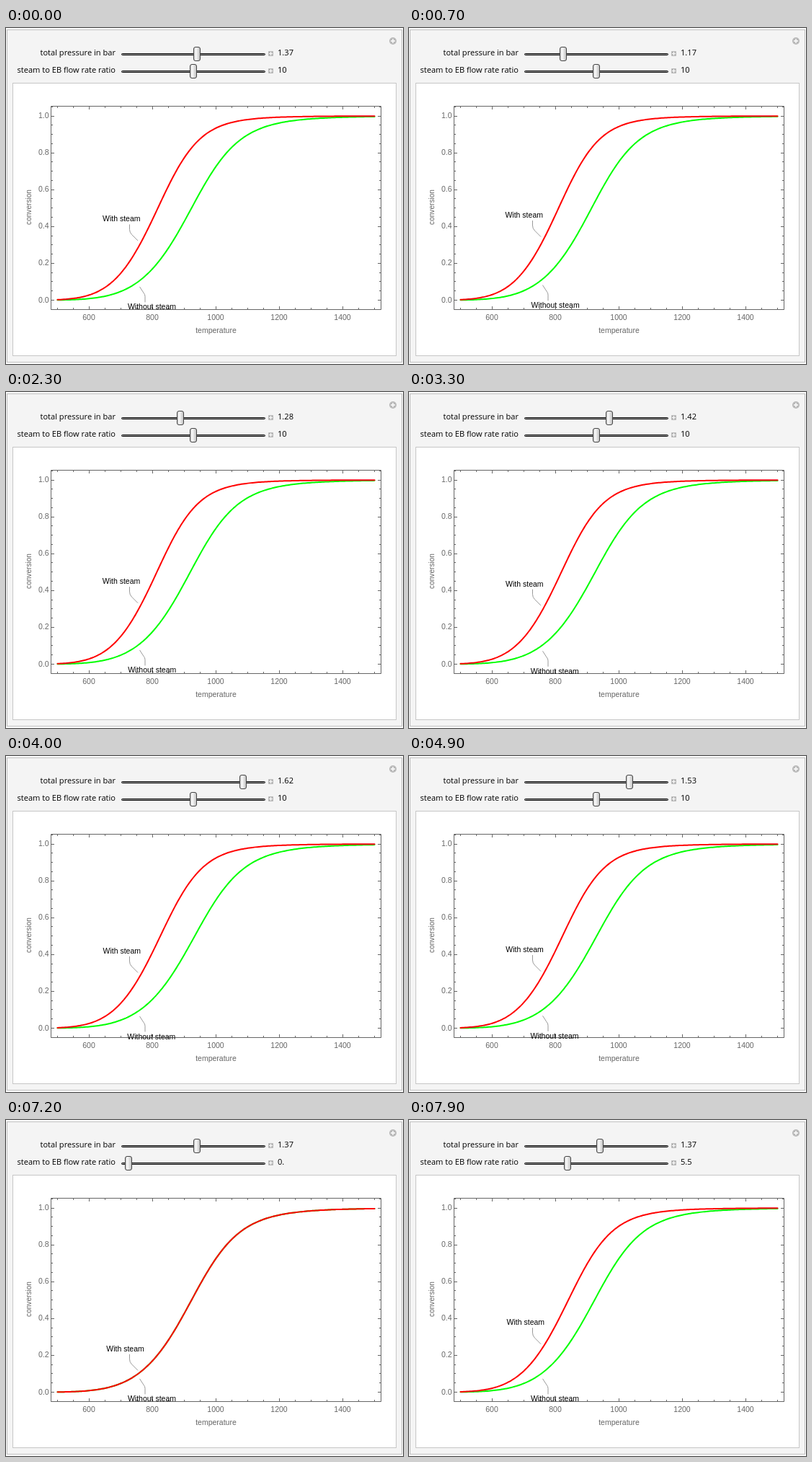
Recreate the animation shown at these times as an HTML page. Size 551 px wide and 466 px high, loop 8 s.

```html
<!DOCTYPE html>
<html lang="en">
<head>
<meta charset="utf-8">
<title>Equilibrium conversion</title>
<style>
  html, body { margin: 0; width: 100%; height: 100%; overflow: hidden; background: #fff; }
  svg { display: block; }
  .ui { font: 11.1px "Open Sans", "Noto Sans", sans-serif; fill: #000; }
  .plot { font: 10.5px "Liberation Sans", Arial, sans-serif; fill: #666; }
  .side { font-size: 10.1px; }
  .note { fill: #000; }
  .end { text-anchor: end; }
  .mid { text-anchor: middle; }
  .line { fill: none; stroke: #666; stroke-width: 1; }
  .curve { fill: none; stroke-width: 2; stroke-linejoin: round; stroke-linecap: round; }
  .leader { fill: none; stroke: #999; stroke-width: 1; }
</style>
</head>
<body>
<svg width="551" height="466" viewBox="0 0 551 466">
  <defs>
    <linearGradient id="metal">
      <stop offset="0" stop-color="#c4c4c4"/>
      <stop offset=".35" stop-color="#fafafa"/>
      <stop offset="1" stop-color="#bdbdbd"/>
    </linearGradient>
    <g id="track">
      <rect x="160.5" y="-1" width="199" height="2" rx="1" fill="#aaa" stroke="#000"/>
      <rect x="364" y="-4.5" width="7" height="7" rx="1" fill="#b9b9b9"/>
      <path d="M365 -1h5M367.5 -3.5v5" stroke="#fff"/>
    </g>
    <rect id="thumb" x="-4.5" y="-10" width="9" height="19" rx="2.5" fill="url(#metal)" stroke="#444"/>
  </defs>

  <rect x="1.5" y="2.5" width="548" height="461" fill="#f4f4f4" stroke="#bfbfbf"/>
  <rect x="9.5" y="76.5" width="532" height="378" fill="#fff" stroke="#c6c6c6"/>
  <circle cx="537" cy="18" r="5" fill="#b9b9b9"/>
  <path d="M534 18h6M537 15v6" stroke="#fff" stroke-width="1.4"/>

  <g class="ui">
    <text class="end" x="152" y="38">total pressure in bar</text>
    <text class="end" x="152" y="62">steam to EB flow rate ratio</text>
    <text id="pText" x="377" y="38"></text>
    <text id="sText" x="377" y="62"></text>
  </g>
  <use href="#track" y="36.5"/>
  <use href="#track" y="60.5"/>
  <use id="pThumb" href="#thumb" y="36.5"/>
  <use id="sThumb" href="#thumb" y="60.5"/>

  <g class="plot">
    <path id="ticks" class="line"/>
    <g id="tickText"></g>
    <text class="mid" x="291.5" y="423">temperature</text>
    <text class="mid side" transform="translate(35 248.5) rotate(-90)">conversion</text>
  </g>
  <path id="dry" class="curve" stroke="#0f0"/>
  <path id="wet" class="curve" stroke="#f00"/>
  <path id="wetLeader" class="leader"/>
  <path id="dryLeader" class="leader"/>
  <g class="plot">
    <text id="wetNote" class="note">With steam</text>
    <text id="dryNote" class="note">Without steam</text>
  </g>
</svg>
<script>
const $ = id => document.getElementById(id);
const set = (id, attrs) => {
  for (const name in attrs) $(id).setAttribute(name, attrs[name]);
};
const px = T => 291.5 + (T - 1000) * 0.44;
const py = X => 377.5 - X * 255.5;

// Equilibrium of EB = styrene + H2, diluted with steam ratio S at pressure P
function conversion(T, P, S) {
  const K = Math.exp(0.425 + 14440 * (1 / 1000 - 1 / T));
  const a = P + K, b = K * S, c = K * (1 + S);
  return (Math.sqrt(b * b + 4 * a * c) - b) / (2 * a);
}

function curve(P, S) {
  const points = [];
  for (let T = 500; T <= 1500; T += 5)
    points.push(px(T).toFixed(2) + ' ' + py(conversion(T, P, S)).toFixed(2));
  return 'M' + points.join('L');
}

function drawAxes() {
  const L = 62.5, R = 520.5, top = 108.5, bottom = 390.5;
  const snap = v => Math.floor(v + 1e-6) + 0.5;
  let d = `M${L} ${top}H${R}V${bottom}H${L}Z`, labels = '';
  for (let T = 500; T <= 1500; T += 50) {
    const major = T % 200 === 0, n = major ? 4.5 : 2.5, x = snap(px(T));
    d += `M${x} ${bottom}v${-n}M${x} ${top}v${n}`;
    if (major) labels += `<text class="mid" x="${px(T) - 0.5}" y="404.5">${T}</text>`;
  }
  for (let i = -1; i <= 21; i++) {
    const major = i % 4 === 0, n = major ? 4.5 : 2.5, y = snap(py(i / 20));
    d += `M${L} ${y}h${n}M${R} ${y}h${-n}`;
    if (major) labels += `<text class="end" x="59.5" y="${py(i / 20) + 3}">${(i / 20).toFixed(1)}</text>`;
  }
  set('ticks', { d });
  $('tickText').innerHTML = labels;
}

// Each control sweeps at 1/25 of its range per step and rests at its start value
function pressure(k) {
  if (k === 0) return 1.37;
  if (k < 30) return Math.min(1.37, 1 + 0.028 * Math.abs(k - 13));
  return Math.max(1.37, 1.7 - 0.028 * Math.abs(k - 43));
}
const ratio = k => Math.min(10, 0.8 * Math.abs(k - 72));
const show = v => Number.isInteger(v) ? v + '.' : String(v);

function draw(k) {
  const P = Math.round(pressure(k) * 100) / 100;
  const S = Math.round(ratio(k) * 2) / 2;
  $('pText').textContent = show(P);
  $('sText').textContent = S === 10 ? '10' : show(S);
  set('pThumb', { x: Math.round(170 + (P - 1) * 180 / 0.7) });
  set('sThumb', { x: Math.round(170 + S * 9) });
  set('dry', { d: curve(P, 0) });
  set('wet', { d: curve(P, S) });

  const wy = py(conversion(765, P, S)) - 31;
  set('wetNote', { x: 133 + (wy - 255) * 0.1, y: wy + 3.5 });
  set('wetLeader', { d: `M171.5 ${wy + 7.5}v7q0 4 3 7l8.5 8.5` });

  const dy = py(conversion(760, P, 0)) + 36.8;
  set('dryNote', { x: 169 - (dy - 386.5) * 0.3, y: dy + 3.5 });
  set('dryLeader', { d: `M193 ${dy - 6.5}v-8q0 -3 -2 -5l-5.5 -8.5` });
}

drawAxes();
let last = -1;
const start = performance.now();
function tick() {
  const k = Math.floor((performance.now() - start) / 100) % 80;
  if (k !== last) draw(last = k);
  requestAnimationFrame(tick);
}
tick();
</script>
</body>
</html>
```
